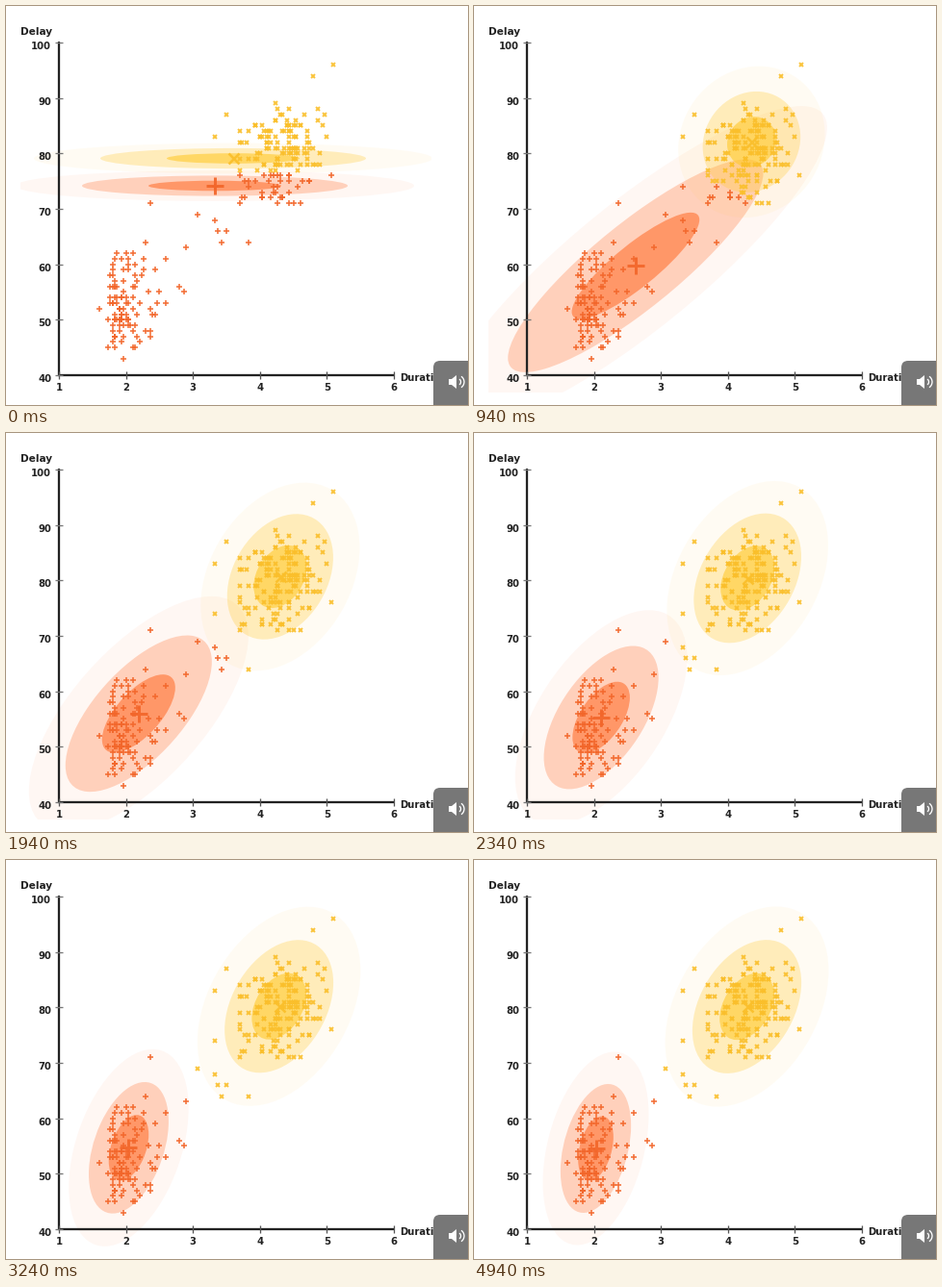
Animation of 480x415 px, one loop 5.44 s. Source, as a matplotlib script:

```python
import numpy as np
import matplotlib.pyplot as plt
from matplotlib.animation import FuncAnimation
from matplotlib.patches import Arc, Ellipse, FancyBboxPatch, Polygon, Rectangle
from matplotlib.transforms import Affine2D

W, H, DPI = 480, 415, 100
LOOP, STEP = 5440, 20
FIRST_FIT, FIT_GAP = 240, 420
PX = 72 / DPI
ORANGE, YELLOW = "#f2662a", "#fabf2b"
FILL_A, FILL_B = "#ff6e2d", "#ffc828"
INK = "#222222"

# Lone points outside the two clouds: (duration, delay)
LONE = [(5.1, 96), (4.8, 94), (3.07, 69), (3.33, 68), (3.37, 66), (3.5, 66),
        (3.42, 64), (3.83, 64), (2.9, 63), (2.8, 56), (2.88, 55), (1.6, 52),
        (1.98, 43), (2.38, 71), (3.32, 83), (3.5, 87), (3.33, 74), (5.07, 76)]


def to_px(d, v):
    return 55 + (d - 1) * 69.6, 384 - (v - 40) * 5.767


def gauss(cx, cy, sx, sy, rho):
    """Mean and covariance in pixels, y pointing down."""
    c = -rho * sx * sy
    return np.array([cx, cy]), np.array([[sx * sx, c], [c, sy * sy]])


# Each cluster: the initial guess, its first fit and the settled fit
FITS_A = [gauss(217, 187, 69, 5.3, 0), gauss(173, 266.5, 70, 57.5, .88),
          gauss(126.5, 300, 18.3, 33.5, .35)]
FITS_B = [gauss(236, 158.5, 69, 5.3, 0), gauss(289, 140, 25, 25, .05),
          gauss(283.5, 152.5, 28.3, 34.7, .36)]


def fit_at(fits, now):
    guess, first, last = fits
    if now < FIRST_FIT:
        return guess
    k = (now - FIRST_FIT) // FIT_GAP
    u = 1 - np.exp(-(k / 3.3) ** 1.8)
    return tuple(a + (b - a) * u for a, b in zip(first, last))


def cost(fit, pts):
    """Negative log likelihood, up to a constant."""
    mean, cov = fit
    off = pts - mean
    dist = np.einsum("ni,ij,nj->n", off, np.linalg.inv(cov), off)
    return dist + np.log(np.linalg.det(cov))


def short_cloud(rng, n):
    d = 1.73 + rng.gamma(2, .14, n)
    v = 53.5 + 9 * (d - 2) + rng.normal(0, 5.3, n)
    ok = (d < 2.65) & (v > 44.6) & (v < 66)
    return d[ok], v[ok]


def long_cloud(rng, n):
    a, b = rng.normal(size=(2, n))
    d = 4.31 + .38 * a
    v = 80.3 + 6 * (.36 * a + .93 * b)
    ok = (np.hypot(a, b) < 2.2) & (d < 5.02) & (v > 69) & (v < 90.5)
    return d[ok], v[ok]


rng = np.random.default_rng(8)
lone_d, lone_v = np.array(LONE).T
short_d, short_v = short_cloud(rng, 104)
long_d, long_v = long_cloud(rng, 185)
dur = np.concatenate([lone_d, short_d, long_d])
delay = np.concatenate([lone_v, short_v, long_v])
points = np.column_stack(to_px(np.round(dur * 30) / 30, np.round(delay)))

fig = plt.figure(figsize=(W / DPI, H / DPI), dpi=DPI, facecolor="white")
ax = fig.add_axes([0, 0, 1, 1])
ax.set(xlim=(0, W), ylim=(H, 0))
ax.axis("off")
stage = Rectangle((15, 8), 427, 394, fc="none", ec="none")
ax.add_patch(stage)


def rings(color, z):
    made = []
    for k, alpha in ((3, .055), (2, .28), (1, .58)):
        e = Ellipse((0, 0), 2 * k, 2 * k, fc=color, ec="none", alpha=alpha, zorder=z)
        ax.add_patch(e)
        e.set_clip_path(stage)
        made.append(e)
    return made


def marks(shape, color, size, width, z):
    return ax.plot([], [], shape, ls="none", color=color, ms=size * PX,
                   mew=width * PX, alpha=.92, zorder=z)[0]


def label(x, y, text, size, align):
    ax.text(x, y, text, size=size * PX, ha=align, va="baseline", color=INK,
            family="DejaVu Sans", weight="bold", zorder=8)


def line(x, y, color=INK, width=2.3):
    ax.plot(x, y, color=color, lw=width * PX, solid_capstyle="butt", zorder=6)


rings_a, rings_b = rings(FILL_A, 1), rings(FILL_B, 2)
plus = marks("+", ORANGE, 6.5, 1.6, 4)
cross = marks("x", YELLOW, 5, 1.9, 4)
core_a = marks("+", ORANGE, 18, 3, 5)
core_b = marks("x", YELLOW, 11, 2.6, 5)

# Axes
line([55, 55], [37, 385])
line([54, 404], [384, 384])
for n in range(1, 7):
    x, _ = to_px(n, 40)
    line([x, x], [380, 388], "#555555", 1.3)
    label(x, 399.5, str(n), 10, "center")
for n in range(40, 101, 10):
    _, y = to_px(1, n)
    line([51, 59], [y, y], "#777777", 1.3)
    label(47, y + 7, str(n), 10, "right")
label(15, 30.5, "Delay", 10.5, "left")
label(409.5, 390, "Duration", 10, "left")

# Sound button
ax.add_patch(FancyBboxPatch((450, 375), 50, 60, boxstyle="round,pad=6,rounding_size=7",
                            fc="#777777", ec="none", zorder=10))
ax.add_patch(Polygon([(460, 388), (463, 388), (468, 384), (468, 398), (463, 394),
                      (460, 394)], fc="white", ec="none", zorder=11))
for size in (7, 14):
    ax.add_patch(Arc((469, 391), size, size, theta1=-55, theta2=55,
                     ec="white", lw=1.3 * PX, zorder=11))


def place(group, core, fit):
    mean, cov = fit
    m = np.eye(3)
    m[:2, :2], m[:2, 2] = np.linalg.cholesky(cov), mean
    for e in group:
        e.set_transform(Affine2D(m) + ax.transData)
    core.set_data(mean[:1], mean[1:])


def draw(i):
    fit_a, fit_b = (fit_at(fits, i * STEP) for fits in (FITS_A, FITS_B))
    place(rings_a, core_a, fit_a)
    place(rings_b, core_b, fit_b)
    late = cost(fit_b, points) < cost(fit_a, points)
    plus.set_data(*points[~late].T)
    cross.set_data(*points[late].T)
    return [*rings_a, *rings_b, plus, cross, core_a, core_b]


anim = FuncAnimation(fig, draw, frames=LOOP // STEP, interval=STEP,
                     init_func=lambda: draw(0), repeat=True, repeat_delay=0, blit=False)
plt.show()
```
